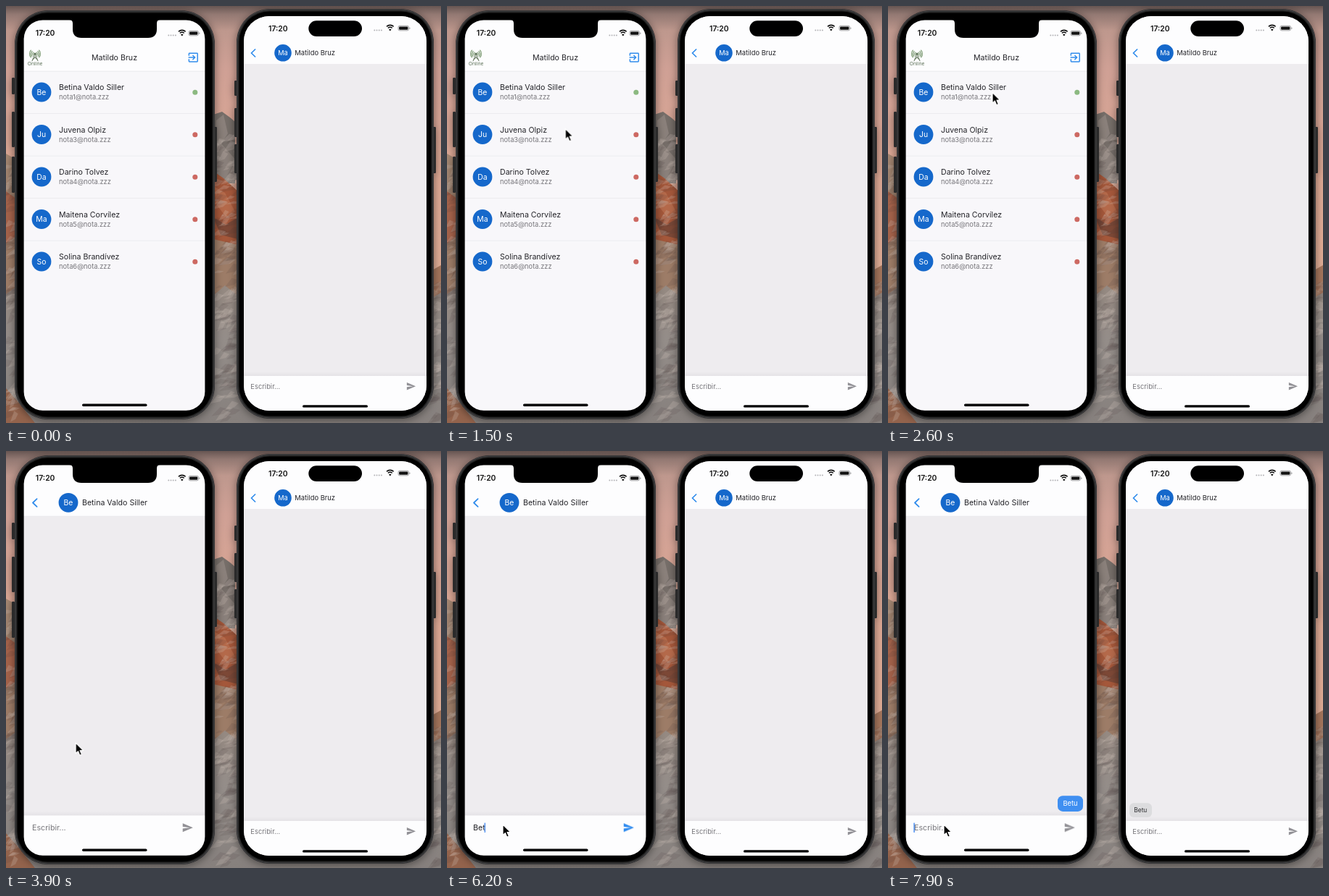
An HTML page for the animation above (8 s loop, 600 px wide and 576 px high).

```html
<!DOCTYPE html>
<html lang="es">
<head>
<meta charset="utf-8">
<title>Chat</title>
<style>
html, body { margin: 0; width: 100%; height: 100%; overflow: hidden; background: #8a8481; }
svg { display: block; width: 600px; height: 576px; font-family: Inter, "Liberation Sans", sans-serif; }
.name { font-size: 10.6px; fill: #25252a; }
.mail { font-size: 9.3px; fill: #77767b; }
.time { font-size: 10.4px; font-weight: 600; fill: #111; }
.hint { fill: #77767b; }
.mid { text-anchor: middle; }
.line { fill: none; stroke-linecap: round; stroke-linejoin: round; }

/* 1% = 80 ms */
.list, .chat { animation: 8s infinite both; }
.list { animation-name: leave; }
.chat { animation-name: enter; }
@keyframes leave {
  0%, 33.75% { transform: none; visibility: visible; animation-timing-function: cubic-bezier(.32,.72,0,1); }
  40.5% { transform: translateX(-82px); visibility: visible; }
  40.6%, 100% { transform: translateX(-82px); visibility: hidden; }
}
@keyframes enter {
  0%, 33.75% { transform: translateX(251px); animation-timing-function: cubic-bezier(.32,.72,0,1); }
  40.5%, 100% { transform: none; }
}
.cursor { animation: point 8s infinite both; }
@keyframes point {
  0%, 12.49% { transform: translate(262px,350px); visibility: hidden; }
  12.5% { transform: translate(262px,350px); visibility: visible; }
  15% { transform: translate(210px,291px); visibility: visible; animation-timing-function: cubic-bezier(.3,.4,.4,1); }
  23.75%, 43.75% { transform: translate(144px,119.5px); visibility: visible; animation-timing-function: cubic-bezier(.4,0,.3,1); }
  53.75%, 100% { transform: translate(77px,516px); visibility: visible; }
}
.step { animation: 8s step-end infinite both; }
.ch1 { animation-name: type1; } .ch2 { animation-name: type2; }
.ch3 { animation-name: type3; } .ch4 { animation-name: type4; }
@keyframes type1 { 0% { fill: transparent; } 70% { fill: #25252a; } 90%, 100% { fill: transparent; } }
@keyframes type2 { 0% { fill: transparent; } 72.5% { fill: #25252a; } 90%, 100% { fill: transparent; } }
@keyframes type3 { 0% { fill: transparent; } 76.25% { fill: #25252a; } 90%, 100% { fill: transparent; } }
@keyframes type4 { 0% { fill: transparent; } 80% { fill: #25252a; } 90%, 100% { fill: transparent; } }
.empty { animation-name: empty; }
@keyframes empty { 0% { visibility: visible; } 70% { visibility: hidden; } 90%, 100% { visibility: visible; } }
.send { animation-name: send; }
@keyframes send { 0% { fill: #929196; } 70% { fill: #2f8bef; } 90%, 100% { fill: #929196; } }
.caret { animation-name: caret; }
@keyframes caret {
  0% { visibility: hidden; transform: none; }
  60% { visibility: visible; transform: none; }
  66.25% { visibility: hidden; transform: none; }
  68.75% { visibility: visible; transform: none; }
  70% { visibility: visible; transform: translateX(7px); }
  72.5% { visibility: visible; transform: translateX(13px); }
  76.25% { visibility: visible; transform: translateX(16.2px); }
  80% { visibility: visible; transform: translateX(23px); }
  90%, 100% { visibility: visible; transform: none; }
}
.sent { animation-name: sent; }
.got { animation-name: got; }
@keyframes sent { 0% { visibility: hidden; } 91.25%, 100% { visibility: visible; } }
@keyframes got { 0% { visibility: hidden; } 92.5%, 100% { visibility: visible; } }
</style>
</head>
<body>
<svg id="stage" viewBox="0 0 600 576"></svg>
<script>
const BLUE = '#1568cb', LINK = '#308cec';
const people = ['Betina Valdo Siller', 'Juvena Olpiz', 'Darino Tolvez', 'Maitena Corvílez', 'Solina Brandívez'];
const mailIds = [1, 3, 4, 5, 6];
const owner = 'Matildo Bruz';

let seed = 7;
const random = () => (seed = seed * 16807 % 2147483647) / 2147483647;

const rect = (x, y, w, h, fill, r = 0, extra = '') =>
  `<rect x="${x}" y="${y}" width="${w}" height="${h}" rx="${r}" fill="${fill}" ${extra}/>`;
const text = (x, y, str, cls, size) =>
  `<text x="${x}" y="${y}" class="${cls}"${size ? ` style="font-size:${size}px"` : ''}>${str}</text>`;
const line = (d, color, width) =>
  `<path class="line" d="${d}" stroke="${color}" stroke-width="${width}"/>`;
const avatar = (x, y, r, name) =>
  `<circle cx="${x}" cy="${y}" r="${r}" fill="${BLUE}"/>
   <text x="${x}" y="${y + r * .28}" class="mid" fill="#fff" font-size="${r * .78}">${name.slice(0, 2)}</text>`;
const sendIcon = (x, y, k, cls = '') =>
  `<path class="${cls}" fill="#929196" transform="translate(${x} ${y}) scale(${k})" d="M2 21L23 12 2 3V10L17 12 2 14Z"/>`;

// Small light and dark facets on the rock between x0 and x1
function facets(x0, x1, y0, count) {
  let out = '';
  for (let i = 0; i < count; i++) {
    const x = x0 + random() * (x1 - x0), y = y0 + random() * (576 - y0);
    const w = 4 + random() * 9, h = 2 + random() * 6;
    out += `<path fill="${i % 2 ? '#46383420' : '#d8c8be38'}" d="M${x - w} ${y + h}L${x} ${y - h}L${x + w} ${y - h / 2}L${x + w / 3} ${y + h / 2}Z"/>`;
  }
  return out;
}

function landscape() {
  return `
  ${rect(0, 0, 600, 576, 'url(#sky)')}
  <path fill="#a58772" d="M0 204L14 212V300H0Z"/>
  <path fill="#766e69" d="M286 150L298 146 309 154 316 160V245H286Z"/>
  <path fill="#8b817b" d="M290 158L300 150 306 176 297 190 318 214V240H286Z"/>
  <path fill="#a4624a" d="M0 256L14 266V340H0Z"/>
  <path fill="#a4573a" d="M286 228L300 238 320 256V330H286Z"/>
  <path fill="#b4694a" d="M288 250L302 258 316 284 304 292 290 274Z"/>
  <path fill="#7c4836" d="M286 292L303 302 320 292V322L296 316Z"/>
  <path fill="#9d7c67" d="M0 328L14 318V410H0ZM286 322L320 330V412H286Z"/>
  <path fill="#a4755c" d="M586 366L600 358V420H586Z"/>
  <path fill="url(#rock)" d="M0 398L14 388 60 430H286V400L302 386 322 402 330 440H586V404L600 396V576H0Z"/>
  <path fill="#93634c" d="M0 528L16 546 40 576H0Z"/>
  ${facets(0, 14, 222, 70)}${facets(288, 320, 176, 150)}${facets(588, 600, 380, 40)}
  ${rect(0, 0, 600, 34, 'url(#dusk)')}`;
}

function body(x, y, w, h, buttons) {
  const side = buttons.map(([bx, by, bh]) => rect(bx, by, 4, bh, '#29292b', 1.2)).join('');
  return `<g filter="url(#shadow)">${side}${rect(x, y, w, h, '#262628', 46)}</g>
    ${rect(x + 1, y + 1, w - 2, h - 2, 'none', 45, 'stroke="#48484a" stroke-width="1"')}
    ${rect(x + 3.5, y + 3.5, w - 7, h - 7, '#000', 42)}`;
}

function statusBar(tx, ty, dx, dy, wx, wy, bx, by, bw) {
  const dots = [0, 1, 2, 3].map(i =>
    `<circle cx="${dx + i * 3.2}" cy="${dy}" r="1" fill="#b4b4b7"/>`).join('');
  return text(tx, ty, '17:20', 'time') + dots +
    `<g transform="translate(${wx} ${wy})">
      <path class="line" stroke="#111" stroke-width="1.6" style="stroke-linecap:butt"
        d="M-4.8-3.3A7 7 0 0 1 4.8-3.3M-2.9-1.1A4.2 4.2 0 0 1 2.9-1.1"/>
      <path fill="#111" d="M0 2.8L-1.8 .9A2.6 2.6 0 0 1 1.8 .9Z"/></g>` +
    rect(bx, by, bw, 6.6, 'none', 2, 'stroke="#8b8b8d" stroke-width=".8"') +
    rect(bx + 1.1, by + 1.1, bw - 2.2, 4.4, '#111', 1.1) +
    rect(bx + bw + .9, by + 2.2, 1, 2.2, '#8b8b8d', .5);
}

function row(name, i) {
  const y = 119 + i * 58.5;
  const divider = i < people.length - 1 ? rect(24, y + 29.2, 251, .8, '#eae9ed') : '';
  return avatar(49, y, 13.4, name) +
    text(73, y - 2.8, name, 'name') +
    text(73, y + 10.3, `nota${mailIds[i]}@nota.zzz`, 'mail') +
    `<circle cx="260.8" cy="${y + .2}" r="3.5" fill="${i ? '#cd6962' : '#8cb981'}"/>` + divider;
}

function antenna() {
  const arcs = [3, 5.3, 7.4].map(r => {
    const a = r * .76, b = r * .65;
    return `M${40 - a} ${66 - b}A${r} ${r} 0 0 0 ${40 - a} ${66 + b}M${40 + a} ${66 - b}A${r} ${r} 0 0 1 ${40 + a} ${66 + b}`;
  }).join('');
  return line(arcs, '#76966c', 1.2) +
    line('M40 66L36 76M40 66L44 76M38.6 70L43 74M41.4 70L37 74', '#5f7358', 1) +
    '<circle cx="40" cy="66" r="1.5" fill="#4f6748"/>' +
    `<text x="40" y="82" class="mid" fill="#4d6347" font-size="6.7" style="font-family:'Open Sans',sans-serif">Online</text>`;
}

function listPage() {
  return `<g class="list">
    ${rect(24, 19, 251, 541, '#f8f7fa')}${rect(24, 19, 251, 71, '#fdfdfe')}${rect(24, 89.7, 251, .8, '#e6e5e9')}
    ${antenna()}
    ${text(149.5, 75, owner, 'name mid')}
    <path fill="${LINK}" transform="translate(249.4 62.2) scale(.74)" d="M10.1 15.6L11.5 17l5-5-5-5-1.4 1.4L12.7 11H3v2h9.7ZM19 3H5a2 2 0 0 0-2 2v4h2V5h14v14H5v-4H3v4a2 2 0 0 0 2 2h14a2 2 0 0 0 2-2V5a2 2 0 0 0-2-2Z"/>
    ${people.map(row).join('')}</g>`;
}

// Header, message area and footer shared by both chats
function chatFrame(x, w, top, head, foot) {
  return rect(x, top, w, 550, '#eeecef') +
    rect(x, top, w, head - top, '#fdfdfe') + rect(x, head - .3, w, .7, '#e8e7ea') +
    rect(x, foot - 6, w, 6, 'url(#lift)') + rect(x, foot, w, 60, '#fdfdfe');
}

function leftChat() {
  const typed = [...'Betu'].map((c, i) => `<tspan class="step ch${i + 1}">${c}</tspan>`).join('');
  return `<g class="chat">
    ${chatFrame(24, 251, 19, 90, 503.5)}
    ${line('M42.6 66.2L37 71.5L42.6 76.8', LINK, 1.8)}
    ${avatar(86, 71.3, 13.4, people[0])}
    ${text(105, 75, people[0], 'name')}
    <g class="step sent">${rect(234, 476.3, 35, 21.6, '#3f8ff1', 7)}
      <text x="251.5" y="490.4" class="mid" fill="#fff" font-size="9.4">Betu</text></g>
    ${text(36, 524, 'Escribir...', 'hint step empty', 10.7)}
    <text x="36" y="524" font-size="10.7">${typed}</text>
    ${rect(35.4, 513.5, 1.4, 13.5, '#3c84ee', .6, 'class="step caret"')}
    ${sendIcon(242.4, 512.2, .67, 'step send')}</g>`;
}

function rightChat() {
  return chatFrame(327, 254, 13, 80.7, 511) +
    line('M343.6 60L338.4 65L343.6 70', LINK, 1.7) +
    avatar(382, 64.8, 11.8, owner) +
    text(398.3, 68.3, owner, 'name', 9.4) +
    `<g class="step got">${rect(333, 486.3, 31, 19.6, '#dcdcde', 6)}
      <text x="348.3" y="499" class="mid" fill="#29292c" font-size="8.4">Betu</text></g>` +
    text(337.3, 528.6, 'Escribir...', 'hint', 9.4) +
    sendIcon(551.7, 518.2, .58);
}

const stops = list => list.map(([at, color, alpha = 1]) =>
  `<stop offset="${at}" stop-color="${color}" stop-opacity="${alpha}"/>`).join('');
const gradient = (id, list) =>
  `<linearGradient id="${id}" x2="0" y2="1">${stops(list)}</linearGradient>`;

document.getElementById('stage').innerHTML = `
<defs>
  ${gradient('sky', [[0, '#b39288'], [.15, '#cfa095'], [.4, '#dda894'], [.62, '#dfac95'], [1, '#8a8481']])}
  ${gradient('dusk', [[0, '#4c403f', .75], [.35, '#5f5150', .4], [1, '#5f5150', 0]])}
  ${gradient('rock', [[0, '#958981'], [.4, '#948d89'], [1, '#86807d']])}
  ${gradient('lift', [[0, '#e2e0e4', 0], [1, '#e2e0e4', .8]])}
  <filter id="shadow" x="-10%" y="-10%" width="120%" height="120%">
    <feDropShadow dx="0" dy="2" stdDeviation="6" flood-color="#000" flood-opacity=".45"/></filter>
  <clipPath id="leftScreen">${rect(24.6, 19.5, 249.8, 539.2, '#fff', 26)}</clipPath>
  <clipPath id="rightScreen">${rect(328, 14, 252, 545, '#fff', 35)}</clipPath>
</defs>
${landscape()}
${body(12, 6, 276, 565, [[8, 99, 23], [8, 146, 49], [8, 208, 50], [287, 167, 76]])}
${body(318, 4, 272, 566, [[315, 103, 21], [315, 141, 40], [315, 191, 40], [589, 167, 64]])}
<g clip-path="url(#leftScreen)">${listPage()}${leftChat()}</g>
<path d="M87 19q5 0 5 5V32q0 12 12 12H196q12 0 12-12V24q0-5 5-5Z"/>
${statusBar(40.8, 41.2, 224.3, 40.5, 242.8, 38.6, 252, 34.3, 13.4)}
${rect(105, 549.6, 89.5, 3.4, '#000', 1.7)}
<g clip-path="url(#rightScreen)">${rightChat()}</g>
${rect(417.3, 20.2, 73.7, 21.8, '#000', 10.9)}
${statusBar(362, 34.6, 508.3, 33.6, 529.8, 31.6, 541, 27.3, 14.5)}
${rect(409, 551.3, 90, 3.3, '#000', 1.65)}
<path class="cursor" stroke="#fff" stroke-width="1.2" stroke-linejoin="round"
  d="M0 0V14.6L3.3 11.6 5.7 17.2 8.3 16.1 6 10.6H10.6Z"/>`;
</script>
</body>
</html>
```
